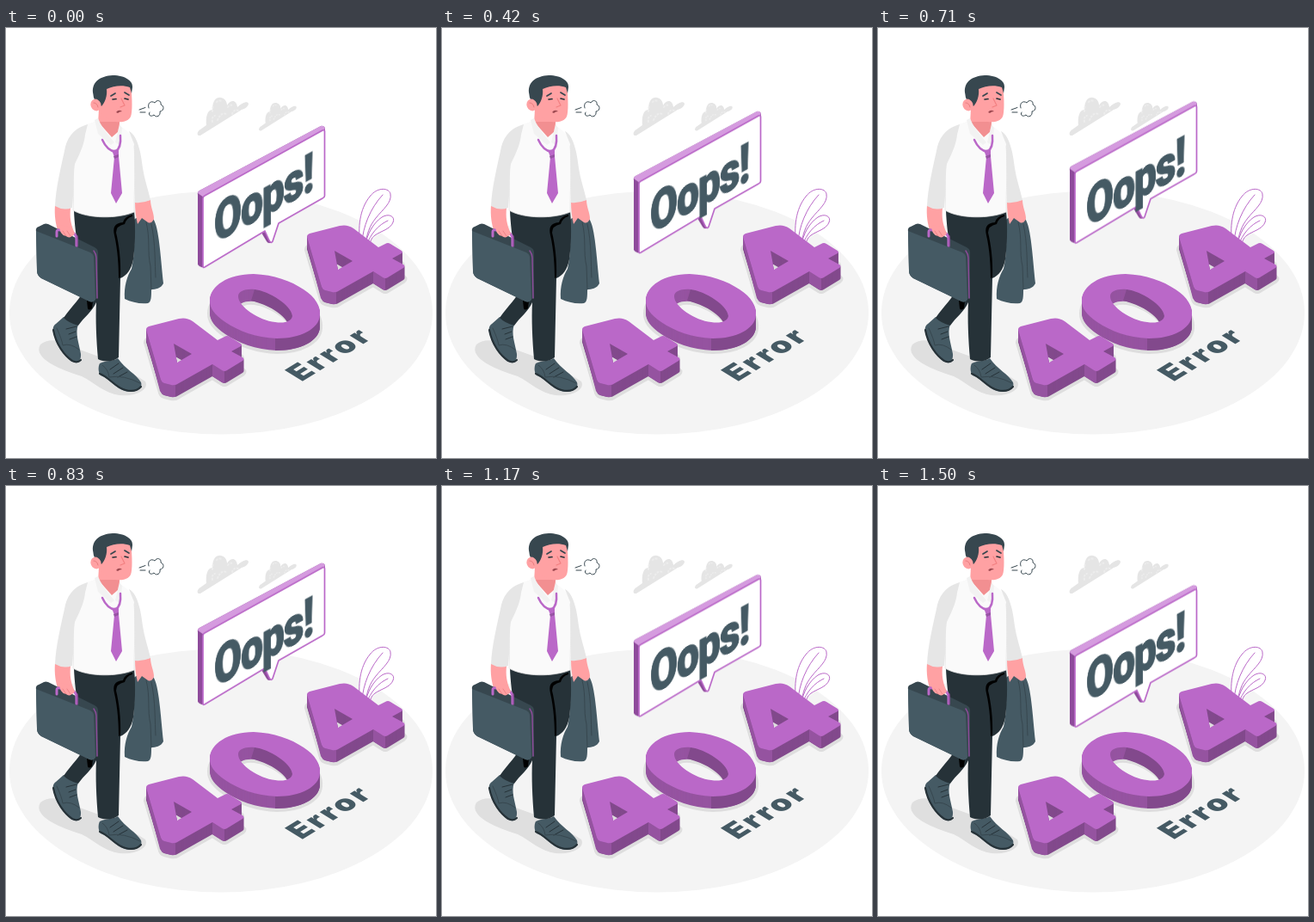
An HTML page for the animation above (1.54 s loop, 500 by 500 pixels).

```html
<!DOCTYPE html>
<html lang="en">
<head>
<meta charset="utf-8">
<title>404 Error</title>
<style>
html, body { margin: 0; width: 100%; height: 100%; overflow: hidden; background: #fff; }
svg { display: block; width: 100vw; height: 100vh; }
.float { animation: float 1540ms linear -52ms infinite; }
.bubble { --low: 2.1px; --high: -28.7px; }
.word { --low: 1.4px; --high: -19.1px; }
@keyframes float {
  0%, 100% { transform: translateY(var(--low)); }
  50% { transform: translateY(var(--high)); }
}
.line { fill: none; stroke-linecap: round; stroke-linejoin: round; }
.shade { fill: #dedede; stroke: #dedede; stroke-width: 6; stroke-linejoin: round; }
text { fill: #455a64; }
</style>
</head>
<body>
<svg viewBox="0 0 500 500">
<defs>
  <path id="four" d="M350 243 Q350 240 353 239 L388 230 Q397 228 404 233 L433 255 L441 251 Q444 249 447 251 L460 259 Q462 261 460 262 L449 268 L462 275 Q465 277 462 279 L444 290 Q441 292 438 290 L427 283 L388 305 Q384 308 379 307 L371 305 Q368 304 367 301 Z M382 259 L386 281 L403 271 Z" fill-rule="evenodd"/>
  <path id="zero" d="M237 317 C237 300 258 286 288 286 C312 287 331 294 346 304 C360 313 366 324 365 334 C364 350 342 361 315 361 C290 360 270 352 255 342 C242 333 237 326 237 317 Z M270 312 C270 306 278 303 289 304 C306 306 332 322 333 335 C332 341 324 344 313 342 C294 340 270 324 270 312 Z" fill-rule="evenodd"/>
  <g id="four3d">
    <g data-extrude="four" fill="#82498c"></g>
    <path d="M350 243 L367 301 Q368 304 371 305 L379 307 H384 V321 H379 L371 319 Q368 318 366 314 L350 253 Z M427 283 L438 290 L441 291 V305 L438 304 L427 297 Z" fill="#9553a0"/>
    <use href="#four" fill="#ba68c8"/>
  </g>
  <g id="cloud">
    <path d="M233 113 C232 104 234 95 240 95 C240 84 245 80 250 81 C255 82 257 86 257 90 C261 83 268 83 269 92 C274 87 281 84 282 88 C282 91 278 94 274 95 L226 125 C221 126 222 120 226 118 Z" fill="#e5e5e5"/>
    <path class="line" d="M240 97 Q240 92 242 90 M246 107 Q251 96 257 101 M258 92 Q261 88 265 91 M245 86 Q248 83 252 86 M240 109 Q239 103 243 102 M263 100 Q265 94 270 96" stroke="#ededed" stroke-width="2" stroke-dasharray="1 3"/>
  </g>
</defs>

<ellipse cx="250" cy="331" rx="246" ry="141.5" fill="#f4f4f4"/>
<use href="#cloud"/>
<use href="#cloud" transform="translate(130.5 27.500) scale(.735)"/>

<path d="M40 368 C48 361 62 362 72 369 L105 381 C120 385 148 402 162 411 C167 421 150 429 132 427 C115 425 102 412 88 405 C65 398 30 384 40 368 Z" fill="#dfdfdf"/>
<g class="shade">
  <use href="#four" y="15"/>
  <use href="#four" x="-187" y="123"/>
  <use href="#zero" y="15"/>
</g>

<g class="line" stroke="#ba68c8" stroke-width="1" style="fill:#fff">
  <path d="M412 252 C409 232 411 211 423 196 C432 184 446 186 447 193 C449 203 438 211 430 221 C423 230 419 239 418 254 Z"/>
  <path d="M417 255 C420 239 427 227 437 220 C445 215 453 219 450 226 C447 234 436 236 429 241 C425 244 423 248 422 257 Z"/>
  <path d="M414 249 C415 232 423 210 438 194 M419 253 C424 239 433 229 444 224" fill="none"/>
</g>

<use href="#four3d"/>
<g>
  <g data-extrude="zero" fill="#9553a0"></g>
  <path d="M313 361 V375 C343 375 364 364 365 348 V334 Z M289 304 C306 306 332 322 333 335 Q332 340 327 342 C322 333 306 322 285 317 Z" fill="#82498c"/>
  <use href="#zero" fill="#ba68c8"/>
</g>
<use href="#four3d" transform="translate(-187 108)"/>

<text transform="matrix(.866 -.53 .86 .53 343.500 411.500)" font-family="Inter, sans-serif" font-weight="900" font-size="33.500" letter-spacing="3">Error</text>

<g class="float bubble">
  <path d="M223 194 Q222 191 225 189 L366 114 Q369 113 371 116 V194 L229 278 Q226 279 223 275 Z" fill="#8e4b9b"/>
  <path d="M223 192 Q223 190 225 189 L366 114 Q369 113 371 116 L370 119 L230 197 Z" fill="#d59bdf"/>
  <path d="M297 238 L301 237 L309 250 H306 Q304 250 303 248 Z" fill="#8e4b9b"/>
  <path d="M229 198 Q229 196 231 195 L368 119 Q370.500 118 370.500 120 V195 Q370.500 197 368 198 L317 227 L310 248 Q308 251 306 247 L301 236 L231 278 Q229 279 229 277 Z" fill="#fff" stroke="#ba68c8" stroke-width="1.700" stroke-linejoin="round"/>
</g>
<g class="float word">
  <text transform="matrix(.74 -.4 0 1 242 250.500)" font-family="Roboto, sans-serif" font-weight="900" font-size="63" letter-spacing="-1.800" stroke="#455a64" stroke-width="1">Oops!</text>
</g>

<!-- jacket -->
<path d="M147 226 C151 217 166 216 171 222 C178 230 180 270 183 297 C180 303 174 304 169 304 C169 312 169 319 165 320 C156 321 146 319 138 315 C137 300 141 288 146 280 C150 262 150 240 147 226 Z" fill="#455a64"/>
<path class="line" d="M163 226 C168 245 164 260 168 277 L169 304 M169 228 C174 250 173 275 174 290" stroke="#37474f"/>

<!-- shoes -->
<g fill="#455a64">
  <path d="M58 344 L67 336 L84 345 C80 355 85 367 87 379 C88 389 80 391 74 386 C64 377 58 367 55 354 C54 349 55 346 58 344 Z"/>
  <path d="M109 390 C117 386 124 388 130 384 C138 396 152 403 157 412 C160 420 148 425 138 422 C127 419 121 408 110 404 C107 400 107 394 109 390 Z"/>
</g>
<path class="line" d="M55 351 C58 368 68 381 77 387 Q83 390 87 386 M109 402 C120 406 127 418 139 421 Q151 424 157 417" stroke="#263238" stroke-width="2.200"/>
<path class="line" d="M70 350 L82 347 M73 356 L81 353 M74 362 L82 359 M121 397 L131 390 M125 402 L136 395 M130 406 L141 400" stroke="#263238"/>
<path class="line" d="M59 349 Q65 362 66 369 Q75 366 85 374 M112 392 Q119 397 120 406 Q137 403 156 413" stroke="#37474f"/>

<!-- trousers -->
<path d="M79 212 C95 221 130 221 149 213 C151 232 150 255 148 269 C146 281 140 288 133 291 L131 383 C124 389 112 388 107 385 C105 362 104 338 105 319 C100 330 91 336 84 346 Q73 343 67 337 C76 324 87 314 94 300 C87 280 80 240 79 212 Z" fill="#263238"/>
<path d="M147 217 Q138 219 136 226 C126 227 124 232 126 241 C130 258 131 278 131 291 L133 290 C134 270 131 250 128 238 Q128 230 138 228 Q140 221 147 219 Z M94 317 L101 317 L100 326 Q96 329 95 326 Z" fill="#000"/>

<!-- arms and neck -->
<g fill="#ffa1a3">
  <path d="M57 206 C56 219 58 228 60 235 C64 243 70 246 76 243 L80 239 C75 228 74 220 75 209 Z"/>
  <path d="M150 202 L168 200 C168 208 172 215 172 222 Q169 228 165 226 L158 221 L153 228 Q150 216 150 202 Z"/>
  <path d="M108 94 L107 112 L122 130 L132 124 L132 106 Z"/>
</g>

<!-- shirt -->
<path d="M94 112 L106 108 L122 124 L132 120 L134 115 C141 119 147 124 149 135 C152 160 149 190 149 214 C130 222 95 222 78 212 C79 190 77 167 79 146 C82 128 87 117 94 112 Z" fill="#fafafa"/>
<path class="line" d="M149 137 C151 160 149 190 149 214 C130 222 95 222 78 212 C79 190 78 175 78 160" stroke="#e6e6e6" stroke-width=".8"/>
<path d="M95 112 C81 116 73 124 69 138 C64 162 58 185 57 207 Q67 213 77 209 C79 190 78 172 80 158 C86 146 91 135 92 124 Z M143 120 C153 125 157 145 159 163 C161 176 165 187 168 200 Q159 204 150 203 L149 135 Z" fill="#e6e6e6"/>
<path d="M107 109 L123 127 L130 121 L132 109 Z" fill="#f28f91"/>
<path d="M103 107 L107 105 Q111 116 126 133 L122 136 L107 123 Z M132 112 L135 116 L133 137 L127 133 Z" fill="#f2f2f2"/>
<path class="line" d="M112 130 C116 139 122 143 127 144 C132 141 134 136 133 125" stroke="#ba68c8" stroke-width="2.500"/>
<path d="M123 142 L131 141 L131 149 L135 192 L128 204 L122 192 L126 150 Z" fill="#ba68c8"/>
<path d="M125 149 L131 147 L131 150 L126 152 Z" fill="#9753a4"/>

<!-- head -->
<path d="M111 83 L116 66 H145 C147 82 147 98 145 103 C142 110 129 111 122 107 C114 104 110 101 108 96 Z" fill="#ffa1a3"/>
<path d="M101 75 C100 62 110 56 124 55 C139 55 148 62 147 69 L146 76 L144 69 C136 66 125 67 117 71 C118 79 115 87 111 91 L106 87 C101 82 102 79 101 75 Z" fill="#37474f"/>
<ellipse cx="104.500" cy="89.500" rx="6" ry="7" fill="#ffa1a3" transform="rotate(-20 104.500 89.500)"/>
<path class="line" d="M102 87 Q106 87 107 92" stroke="#e87d80" stroke-width="1"/>
<path class="line" d="M134 82 L138 90 L133 92" stroke="#f28082" stroke-width="1.200"/>
<path class="line" d="M122 79 L127 76 M138 75 L143 78" stroke="#37474f" stroke-width="1.700"/>
<path class="line" d="M124 83 L128 82.500 M138 82 L142 83" stroke="#263238" stroke-width="1.700"/>
<path d="M128 98 Q131 94 135 97 Q132 97 130 99 Z" fill="#9c4850"/>

<!-- sigh -->
<path class="line" d="M155 95 L162 92.500 M156 98 H162 M166 93 C164 87 169 84 173 87 C175 83 181 84 180 89 C185 91 183 97 179 97 C180 102 175 105 172 101 C168 104 165 101 167 98" stroke="#37474f" stroke-width="1"/>

<!-- briefcase -->
<path d="M35 237 Q34 232 38 231 L44 228 Q46 227 49 228 L103 255 Q107 257 107 261 L107 314 L97 318 L41 291 Q36 288 36 282 Z" fill="#37474f"/>
<path d="M35 236 L98 261 Q102 263 102 267 L104 316 Q101 320 97 318 L41 291 Q36 288 36 282 Z" fill="#455a64"/>
<path class="line" d="M102 259 Q105 263 105 267 L106 314" stroke="#8e4b9b" stroke-width="1.400"/>
<path class="line" d="M59 242 V237 Q59 234 63 235 L79 239 Q82 241 82 246 V253" stroke="#ba68c8" stroke-width="3"/>
<path class="line" d="M83 242 V254" stroke="#8e4b9b" stroke-width="1.300"/>
<path d="M62 229 L76 232 L80 239 Q74 246 70 242 Q62 241 62 229 Z" fill="#ffa1a3"/>
<path class="line" d="M66 236 L70 242 M71 236 L75 242" stroke="#e87d80" stroke-width=".8"/>
</svg>
<script>
// Build each solid by stacking its outline downwards.
const DEPTH = 14;
for (const solid of document.querySelectorAll('[data-extrude]')) {
  for (let y = DEPTH; y > 0; y--) {
    const layer = document.createElementNS('http://www.w3.org/2000/svg', 'use');
    layer.setAttribute('href', '#' + solid.dataset.extrude);
    layer.setAttribute('y', y);
    solid.append(layer);
  }
}
</script>
</body>
</html>
```
